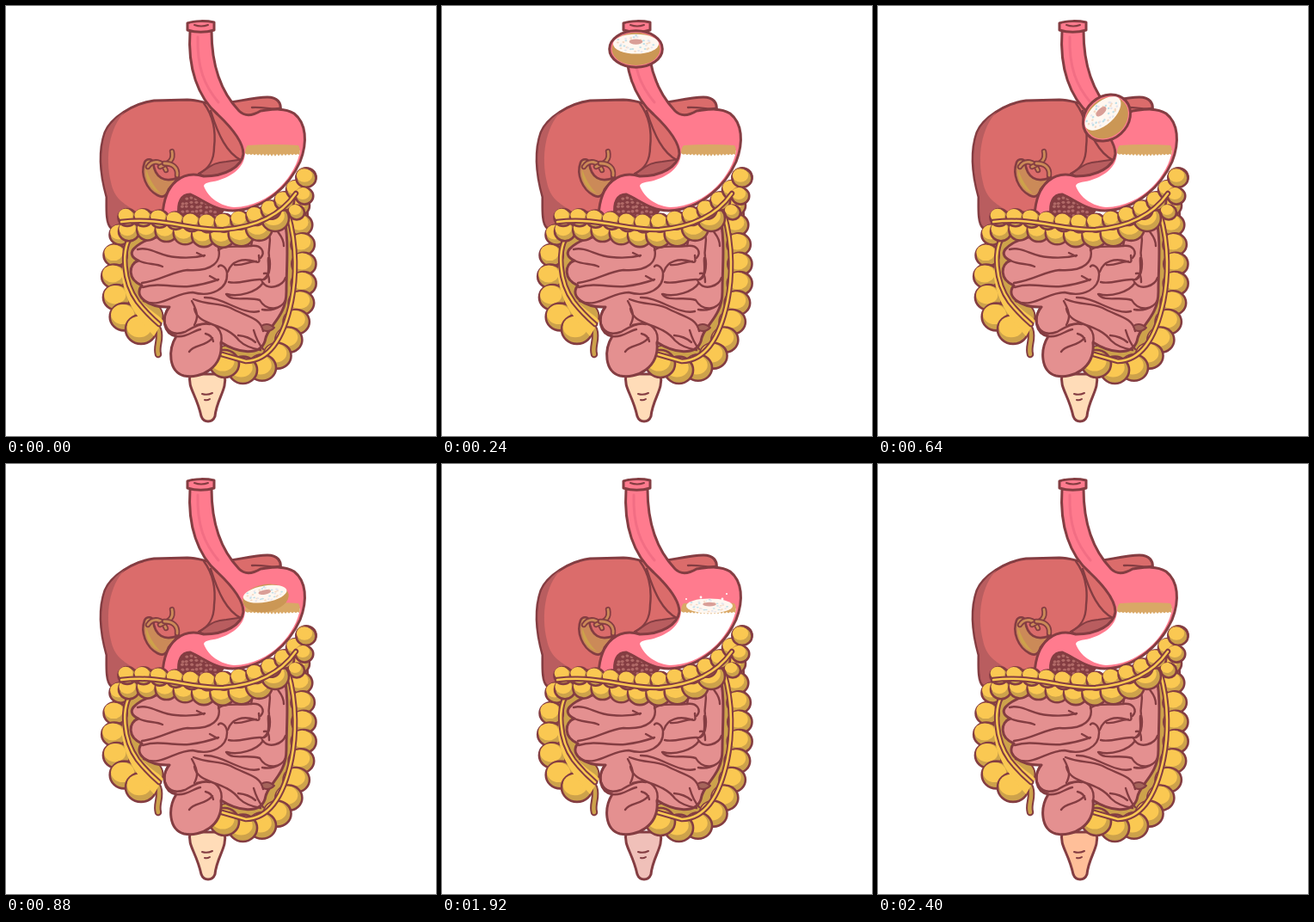
Animation of 500x500 px, one loop 2.96 s. Source, as an HTML page:

```html
<!DOCTYPE html>
<html lang="en">
<head>
<meta charset="utf-8">
<title>Digestion</title>
<style>
html, body { margin: 0; width: 100%; height: 100%; overflow: hidden; background: #fff; }
svg { display: block; width: 100%; height: 100%; }
</style>
</head>
<body>
<svg id="stage" viewBox="0 0 500 500" stroke-linecap="round" stroke-linejoin="round"></svg>
<script>
const LOOP = 2960;
const INK = '#843d42', GOLD = '#fac852', SHADE = '#cda24b', GUT = '#e49090', PINK = '#ff7b8e';
const stage = document.getElementById('stage');

function add(tag, attrs, parent = stage) {
  const el = document.createElementNS('http://www.w3.org/2000/svg', tag);
  set(el, attrs);
  parent.appendChild(el);
  return el;
}
function set(el, attrs) {
  for (const k in attrs) el.setAttribute(k, attrs[k]);
}
const shape = (d, fill, stroke = INK, w = 3) => add('path', { d, fill, stroke, 'stroke-width': w });
const line = (d, w = 2.4, stroke = INK) => shape(d, 'none', stroke, w);
const oval = (cx, cy, rx, ry, fill, parent) => add('ellipse', { cx, cy, rx, ry, fill }, parent);
function tube(d, w, fill) {
  line(d, w + 4);
  line(d, w, fill);
}
function random(seed) {
  return () => (seed = (seed * 16807) % 2147483647) / 2147483647;
}

// A row of pouches spread evenly along a path.
function pouches(d, n, r0, r1, dx = -2, dy = -3) {
  const guide = document.createElementNS('http://www.w3.org/2000/svg', 'path');
  guide.setAttribute('d', d);
  const len = guide.getTotalLength();
  for (let i = 0; i < n; i++) {
    const p = guide.getPointAtLength(len * i / (n - 1));
    const r = r0 + (r1 - r0) * i / (n - 1);
    set(oval(p.x, p.y, r, r * .94, SHADE), { stroke: INK, 'stroke-width': 2.6 });
    oval(p.x + dx, p.y + dy, r * .8, r * .68, GOLD);
  }
}

function drawLiver() {
  shape('M122 258C116 252 117 236 117 222C108 190 109 164 115 147C122 130 148 113 172 110L211 109C223 109 231 113 240 114C262 114 284 106 304 106C315 106 321 112 319 123L300 160L275 185L225 196L190 240L150 240L128 258Z', '#db6c6b');
  shape('M122 256C117 250 119 236 118 222C109 190 110 164 116 147C120 138 129 129 138 123C120 142 115 175 122 205C126 224 136 229 150 238L128 257Z', '#b95d5f', 'none');
  shape('M224 195C238 187 240 182 256 181L277 178L270 192L232 199Z', '#b95d5f', INK, 2);
  line('M230 113C241 128 244 147 242 164C242 180 236 189 224 195');
  line('M238 122C247 151 257 171 273 179M286 118C300 117 310 121 318 119');
}

function drawBile() {
  const tint = [];
  tint.push(shape('M161 182C156 196 163 213 176 220C183 224 187 220 189 213L201 199C184 207 173 199 171 182C170 177 163 177 161 182Z', '#cb8a58', INK, 2.6));
  for (const d of ['M165 187C171 178 182 180 186 191', 'M193 169C196 182 186 183 179 187', 'M184 183C194 183 200 188 199 197']) {
    line(d, 6.4);
    tint.push(line(d, 2.8, '#cb8a58'));
  }
  shape('M163 190C162 204 169 214 180 218C171 209 167 201 163 190Z', SHADE, 'none');
  return tint;
}

function drawPancreas() {
  shape('M199 244C197 226 205 217 214 220C228 224 240 232 252 238L240 254Z', INK);
  const rnd = random(23);
  for (let y = 223; y < 248; y += 5)
    for (let x = 204; x < 246; x += 5.5)
      if (y > 214 + (x - 210) * .5) oval(x + rnd() * 2, y + rnd() * 2, 2, 1.7, '#b06967');
}

function drawStomach() {
  shape('M214 29C211 72 223 106 246 126C263 142 276 158 276 172C274 187 255 198 230 198C207 191 184 204 182 244L201 244C199 228 204 219 214 219C229 225 242 238 264 238C301 237 330 208 342 181C351 158 349 136 335 125C322 117 306 121 296 122C286 128 277 128 271 122C250 100 239 70 239 29Z', PINK);
  shape('M211 20C219 17 233 17 242 19L242 28C232 31 221 31 211 28Z', PINK);
  line('M219 22Q227 25 235 22', 2);
  line('M223 36C222 72 231 93 247 112', 3, '#f26e84');
  shape('M278 170L342 168C338 195 309 233 265 234C245 232 233 219 230 209C231 204 242 205 249 202C264 197 278 187 278 170Z', '#fff', 'none');
  let foam = 'M281 162Q311 160 340 162Q343 167 341 173';
  for (let x = 339; x > 278; x -= 2) foam += `L${x} ${(x >> 1) % 2 ? 172 : 175 - Math.abs(x - 311) / 14}`;
  shape(foam + 'L278 171Q278 165 281 162Z', '#d9a866', 'none');
}

function drawSideColon() {
  tube('M147 266C137 300 143 332 166 361', 31, SHADE);
  tube('M336 242C337 290 338 334 331 354C320 389 302 405 256 410', 28, SHADE);
  tube('M177 376C181 388 174 395 177 405', 4.5, SHADE);
  pouches('M133 266C124 290 124 322 130 344C135 364 146 372 157 376', 6, 12.5, 18);
  shape('M136 282C139 322 145 337 178 361L183 366L172 384C151 360 139 344 135 316Z', GOLD, 'none');
  pouches('M340 232C346 274 349 316 344 342C337 379 324 405 299 420Q278 429 254 416', 12, 13, 17);
  tube('M148 264C132 282 137 322 153 344Q164 358 178 370', 2.6, GOLD);
  tube('M328 242C339 280 337 318 332 343C323 386 307 412 279 413L251 405', 2.6, GOLD);
}

function drawSmallGut() {
  shape('M150 281C165 266 200 264 250 262L322 240C330 270 326 300 326 332C326 363 303 372 301 390C295 407 270 404 250 391C253 421 226 434 207 430C189 425 188 400 198 384C183 381 180 362 190 350C167 351 147 338 158 325C141 318 142 300 154 296C145 292 144 286 150 281Z', GUT);
  [
    'M153 283C167 279 179 291 197 292Q216 294 231 290M222 287L230 291',
    'M154 296C164 301 174 299 182 303M158 322C181 319 192 309 211 307C239 309 253 298 246 278',
    'M159 327C178 321 197 328 213 326C229 324 236 322 247 318M237 314L246 319',
    'M160 343C181 352 196 333 217 333C239 339 258 329 257 311C256 302 249 300 247 303',
    'M247 284C255 277 271 281 284 279C297 277 302 286 296 293',
    'M258 309C262 296 276 293 289 297C297 300 294 294 294 290M266 301C277 302 281 297 291 297',
    'M259 321C270 324 286 317 296 318C307 321 308 300 306 292C304 281 309 279 306 263',
    'M297 319C309 314 304 301 305 293M300 311Q306 309 306 321',
    'M298 321C306 332 322 325 325 316M257 335C271 339 292 332 298 323',
    'M256 335C263 345 281 337 295 342C304 357 321 352 325 342M298 353Q310 355 319 349',
    'M218 341C239 349 244 344 261 351C279 361 296 362 299 378M231 339C251 338 276 360 294 355',
    'M288 377Q292 391 299 399M290 391Q282 384 270 383',
    'M188 352C179 369 188 386 208 379C217 374 226 368 237 370M216 343C225 359 222 365 219 371',
    'M222 371C245 364 253 379 250 393M219 352C223 373 254 367 271 389Q279 397 296 400',
    'M198 384C209 386 217 378 226 376M213 402C219 393 231 397 240 386M232 381Q240 383 241 390',
    'M283 259C289 266 286 275 285 279M312 249C311 264 323 264 323 279'
  ].forEach(d => line(d));
  shape('M297 372Q304 367 312 374Q306 380 299 377Z', '#a5645a', INK, 2);
}

function drawTransverseColon() {
  pouches('M143 262C185 257 212 268 239 267C270 268 288 265 313 247', 9, 12, 16);
  pouches('M141 246C190 245 225 258 262 251C302 245 326 232 349 199', 13, 10.5, 11.5);
  pouches('M349 200L347 221L338 240', 3, 11.5, 9);
  tube('M134 251C183 245 215 262 253 260C290 257 319 244 337 218', 2.4, GOLD);
}

drawLiver();
const bile = drawBile();
drawPancreas();
drawStomach();
const rectum = shape('M214 428C211 445 221 450 227 477C230 485 240 485 243 477C245 456 258 446 254 428Z', '#ffdcb8');
line('M228 451Q234 453 240 450M231 458Q234 459 237 457', 2);
drawSideColon();
drawSmallGut();
drawTransverseColon();

// Doughnut in unit coordinates, scaled to its pose.
const donut = add('g', {});
const bulge = add('ellipse', { rx: 1.1, ry: 1.12, fill: PINK, stroke: INK, 'stroke-width': 3, 'vector-effect': 'non-scaling-stroke' }, donut);
const dough = oval(0, 0, 1, 1, '#cb9755', donut);
const icing = add('g', {}, donut);
oval(0, 0, 1, 1, '#fff7f0', icing);
const sprinkles = add('g', {}, icing);
const rnd = random(71);
for (let i = 0; i < 38; i++) {
  const a = i * 2.4, r = .35 + rnd() * .55;
  oval(Math.cos(a) * r, Math.sin(a) * r, .055, .09, ['#bfdfe8', '#f4d9c4', '#e3e4ee'][i % 3], sprinkles);
}
oval(0, -.22, .29, .28, '#d99e97', icing);
const bubbles = [[284, 157], [301, 155], [309, 159], [326, 157], [331, 151]]
  .map(([x, y], i) => ({ x, y, el: oval(x, y, i % 2 ? 1.4 : 1, i % 2 ? 1.4 : 1, '#fff') }));

// time, x, y, rx, ry, angle
const poses = [
  [80, 226, 22, 28, 16, 0],
  [240, 225.5, 50, 28, 19, 0],
  [400, 235.5, 85, 30, 18, -13],
  [640, 266, 130, 27, 22, -42],
  [720, 283, 142, 27, 20, -28],
  [880, 302, 156, 27, 16, -10],
  [1040, 310, 163, 27, 12, 0],
  [1200, 311, 165, 27, 9, 0],
  [1920, 311, 165, 27, 9, 0],
  [2400, 311, 171, 20, 2, 0]
];
function poseAt(t) {
  const i = Math.max(1, poses.findIndex(p => p[0] >= t));
  const a = poses[i - 1], b = poses[i];
  const k = (t - a[0]) / (b[0] - a[0]);
  return a.map((v, j) => v + (b[j] - v) * k);
}

// Movement is held on a fixed beat, slower while the stomach settles.
function beat(t) {
  if (t >= 720 && t < 1200) return 720 + Math.floor((t - 720) / 160) * 160;
  if (t >= 1200 && t < 1920) return 1200;
  return Math.min(2400, Math.floor(t / 80) * 80);
}

function draw(ms) {
  const t = beat(ms);
  const shown = t >= 80 && t < 2400;
  const floating = t >= 1040;
  donut.style.display = shown ? '' : 'none';
  if (shown) {
    const [, x, y, rx, ry, turn] = poseAt(t);
    set(donut, { transform: `translate(${x} ${y}) rotate(${turn}) scale(${rx} ${ry})` });
    bulge.style.display = t < 720 ? '' : 'none';
    dough.style.display = floating ? 'none' : '';
    sprinkles.style.display = t >= 400 && t < 560 ? 'none' : '';
    set(icing, { transform: floating ? 'scale(1 .95)' : 'translate(0 -.31) scale(.95 .6)' });
  }
  for (const [i, b] of bubbles.entries()) {
    b.el.style.display = t >= 1920 && t < 2400 ? '' : 'none';
    const rise = (t - 1920) / 80 * (1 + i % 3 * .5);
    set(b.el, { cy: b.y - rise % 9 });
  }
  const skin = t >= 2400 || (t >= 400 && t < 560) ? '#ffbf99' : t >= 1200 ? '#f0c0b9' : '#ffdcb8';
  rectum.setAttribute('fill', skin);
  const duct = t >= 1200 && t < 1920 ? '#d0a349' : '#cb8a58';
  bile.forEach((el, i) => el.setAttribute(i ? 'stroke' : 'fill', duct));
}

const start = performance.now();
function tick() {
  draw((performance.now() - start) % LOOP);
  requestAnimationFrame(tick);
}
tick();
</script>
</body>
</html>
```
